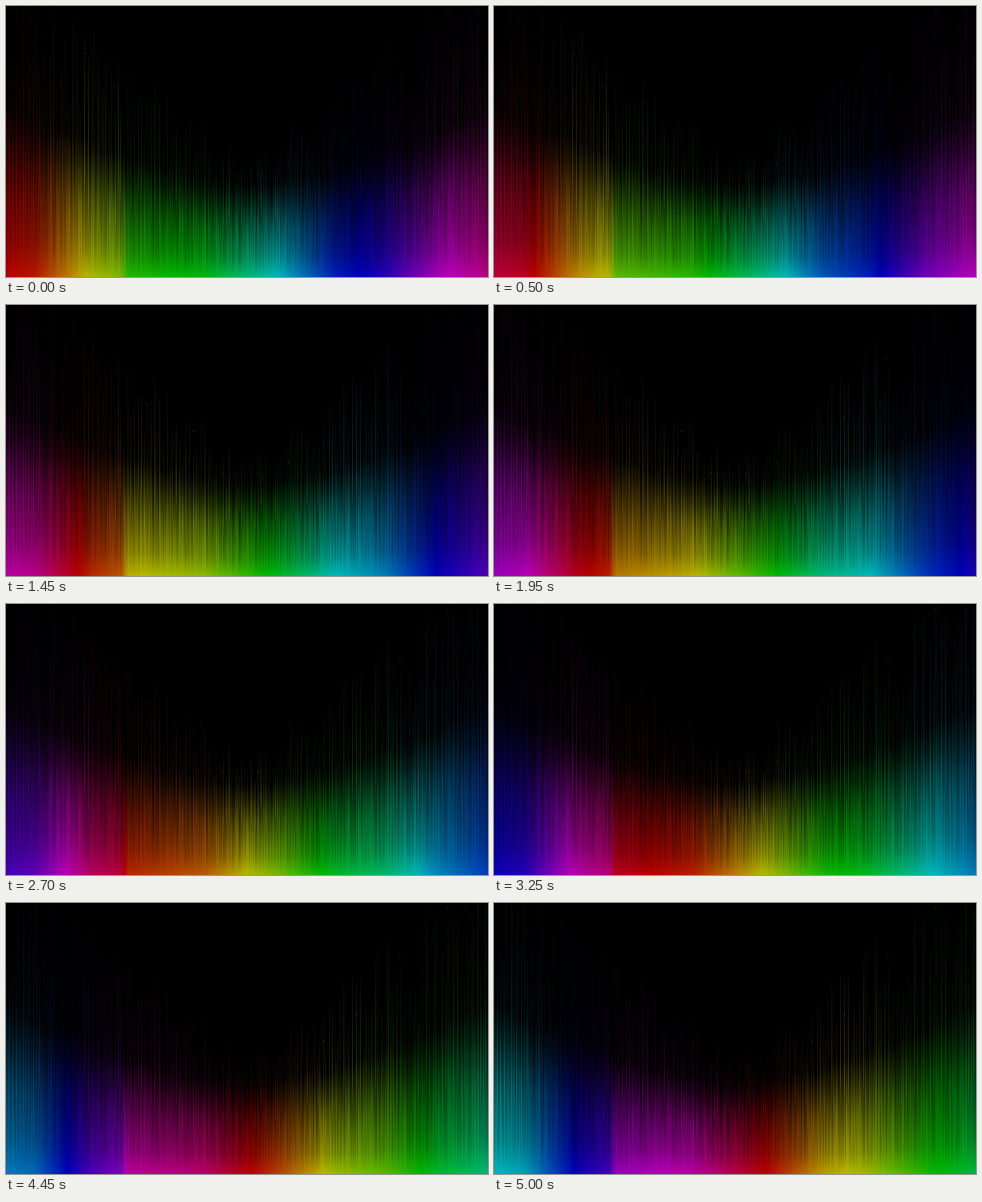
These frames come from a looping animation (500 by 282 pixels, 5.05 s). An HTML page with a canvas:

```html
<!DOCTYPE html>
<html>
<head>
<meta charset="utf-8">
<style>
  html, body { margin: 0; height: 100%; overflow: hidden; background: #000; }
  canvas { display: block; width: 100vw; height: 100vh; }
</style>
</head>
<body>
<canvas id="stage" width="500" height="282"></canvas>
<script>
const W = 500, H = 282, LOOP = 5050, STEP = 50, DEGREES_PER_STEP = 1.8;
const ctx = document.getElementById('stage').getContext('2d');
const mask = document.createElement('canvas');
mask.width = W;
mask.height = H;
const light = mask.getContext('2d');

// Key points of the rainbow across the stage: [x, hue].
const RAINBOW = [[0, 0], [30, 7], [88, 65], [119, 80], [126, 109], [205, 126],
  [285, 183], [340, 230], [390, 250], [450, 295], [500, 318]];

function hueAt(x) {
  const i = Math.max(1, RAINBOW.findIndex(point => point[0] >= x));
  const [x0, h0] = RAINBOW[i - 1], [x1, h1] = RAINBOW[i];
  return h0 + (h1 - h0) * (x - x0) / (x1 - x0);
}

let seed = 71;
function random(min, max) {
  seed = (seed * 16807) % 2147483647;
  return min + (max - min) * seed / 2147483647;
}

// The light forms a valley: low in the middle, high at both sides.
const distance = x => Math.abs(x - W / 2) / (W / 2);
const glowTop = x => 188 - 84 * distance(x) ** 1.5;
const lineTop = x => 160 - 220 * distance(x);

function streak(x, top, bottom, stops) {
  const gradient = light.createLinearGradient(0, top, 0, bottom);
  for (const [at, level] of stops) gradient.addColorStop(at, `rgba(255,255,255,${level})`);
  light.fillStyle = gradient;
  light.fillRect(x, top, 1, bottom - top);
}

function buildMask() {
  light.fillStyle = '#000';
  light.fillRect(0, 0, W, H);

  // Striped glow that melts together towards the floor.
  for (let x = 0; x < W; x++) {
    const k = random(.6, 1);
    streak(x, glowTop(x) + random(-8, 8), H,
      [[0, 0], [.2, .13 * k], [.5, .4 * k], [.8, .6 * (.35 + .65 * k)], [1, .72]]);
  }

  // Thin lines rising out of the glow.
  for (let x = 0; x < W; x += Math.floor(random(2, 5))) {
    const limit = lineTop(x);
    const top = limit + (glowTop(x) - limit) * random(0, .85);
    const level = random(.08, .24);
    streak(x, top, random(215, 270), [[0, .03], [.4, level * .6], [.75, level], [1, 0]]);
  }

  // Sparks hanging near the tips of the lines.
  light.fillStyle = 'rgba(255,255,255,.22)';
  for (let x = 40; x < W; x += random(30, 50))
    light.fillRect(Math.floor(x), Math.floor(lineTop(x) + random(20, 60)), 1, 1);
}

const hues = Array.from({ length: W }, (_, x) => hueAt(x));

function draw(now) {
  const turn = Math.floor((now % LOOP) / STEP) * DEGREES_PER_STEP;
  ctx.globalCompositeOperation = 'source-over';
  hues.forEach((hue, x) => {
    ctx.fillStyle = `hsl(${(hue - turn + 360) % 360}, 100%, 50%)`;
    ctx.fillRect(x, 0, 1, H);
  });
  ctx.globalCompositeOperation = 'multiply';
  ctx.drawImage(mask, 0, 0);
}

function tick() {
  draw(performance.now());
  requestAnimationFrame(tick);
}

buildMask();
tick();
</script>
</body>
</html>
```
